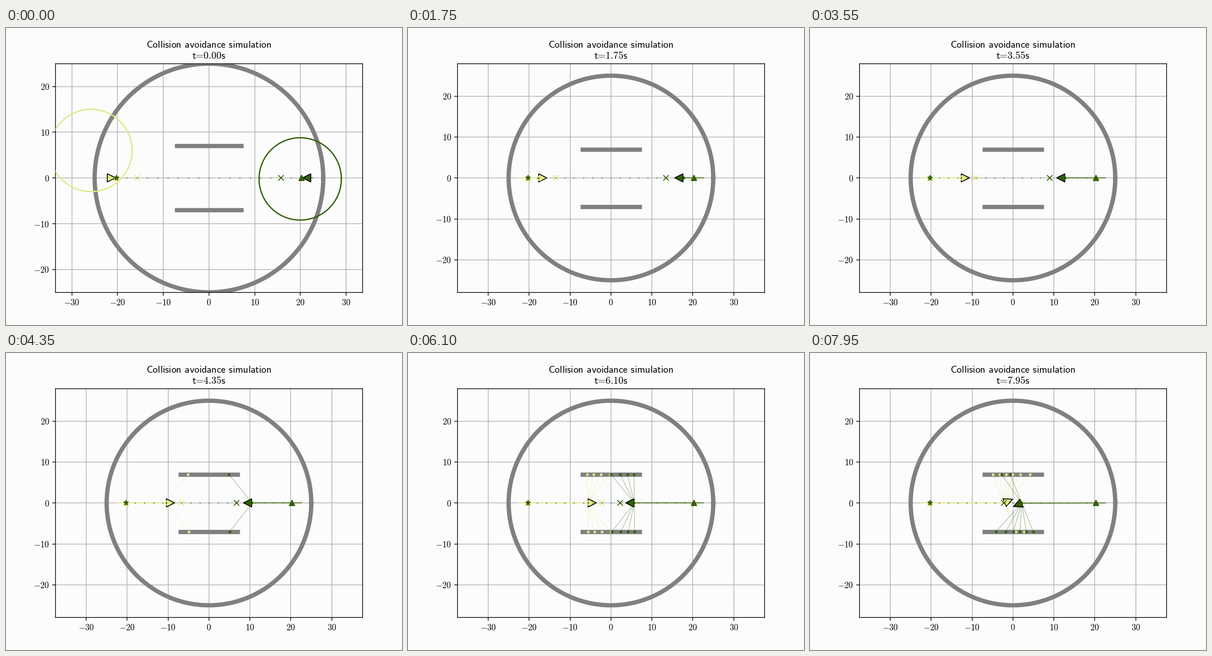
Write a matplotlib script that moves like this. It is 864 px wide and 648 px high and loops after 8000 ms.

```python
import math

import numpy as np
import matplotlib.pyplot as plt
from matplotlib.animation import FuncAnimation
from matplotlib.markers import MarkerStyle

plt.rcParams["mathtext.fontset"] = "cm"

DPI, FRAMES, STEP = 135, 160, 50
PAPER, GREY = "#fcfcfc", "#808080"
YELLOW, GREEN = "#e3e886", "#336005"
WALL_Y, WALL_HALF, RAY_RANGE = 7.0, 7.5, 10.0
RAYS = np.radians(np.linspace(-90, 90, 15))
WAYPOINTS = np.linspace(-20.25, 20.25, 19)
BRAKE = 6.85

fig = plt.figure(figsize=(864 / DPI, 648 / DPI), dpi=DPI, facecolor=PAPER)
ax = fig.add_axes([0.125, 0.11, 0.775, 0.77], facecolor=PAPER)
ax.set_axisbelow(True)
ax.grid(True, color="#b0b0b0", lw=0.8)
ax.set_xticks(range(-30, 31, 10))
ax.set_yticks(range(-20, 21, 10))
for axis in (ax.xaxis, ax.yaxis):
    axis.set_major_formatter(lambda v, _: f"${int(round(v))}$")


def heading_line(y, text=""):
    return fig.text(442.8 / 864, 1 - y / 648, text, ha="center",
                    va="baseline", fontsize=11.66)


GAP = r"\hspace{0.38}"
heading_line(43.3, rf"$\mathsf{{Collision{GAP}avoidance{GAP}simulation}}$")
clock = heading_line(67)

turn = np.linspace(0, 2 * math.pi, 361)
ax.plot(25 * np.cos(turn), 25 * np.sin(turn), color=GREY, lw=5, zorder=2)
for y in (WALL_Y, -WALL_Y):
    ax.plot([-WALL_HALF, WALL_HALF], [y, y], color=GREY, lw=5,
            solid_capstyle="butt", zorder=2)


def travel(t):
    """Position, heading and marker centre of the robot coming from the left."""
    x = -22.64 + 2.776 * min(t, BRAKE) + 0.18 * math.exp(-t / 0.2)
    y, angle = 0.0, 0.6
    if t > 6.3:
        angle += 1.1 * min((t - 6.3) / (BRAKE - 6.3), 1)
    if t > BRAKE:
        late = t - BRAKE
        x += 2.776 * 0.65 * (1 - math.exp(-late / 0.65))
        y = 0.05 * late / 1.1
        angle += 20.3 * (late / 1.1) ** 1.4
    a = math.radians(angle)
    return x, y, angle, x + 1.13 * math.cos(a), y + 1.13 * math.sin(a)


def scan(x, y, angle):
    """Points where the range sensor meets a wall."""
    hits = []
    for a in RAYS + math.radians(angle):
        s = math.sin(a)
        if abs(s) < 1e-6:
            continue
        dist = (math.copysign(WALL_Y, s) - y) / s
        hit = x + dist * math.cos(a)
        if dist < RAY_RANGE and abs(hit) < WALL_HALF - 0.5:
            hits.append((hit, y + dist * s))
    return hits


class Robot:
    def __init__(self, side, color, z, error):
        self.side, self.color, self.error = side, color, error

        def line(dz, **kw):
            return ax.plot([], [], color=color, zorder=z + dz, **kw)[0]

        ax.plot(WAYPOINTS, 0 * WAYPOINTS, "o", color=color, ms=1.2, mew=0,
                zorder=z)
        ax.plot([side * -20.25], [0], "^", color=color, ms=6, zorder=z + 1.2)
        self.trail = line(0.1, lw=0.9)
        self.rays = line(0.2, lw=0.7, alpha=0.4)
        self.hits = line(0.3, ls="", marker="o", ms=3.2, mew=0)
        self.target = line(0.4, ls="", marker="x", ms=6, mew=1)
        self.body = line(0.5, ls="", marker="^", ms=10, mec="black", mew=1)
        self.belief = line(0.6, lw=1.5)

    def update(self, t):
        s = self.side
        x, y, angle, cx, cy = travel(t)
        self.trail.set_data([s * -22.64, s * x], [0, s * y])
        self.body.set_data([s * cx], [s * cy])
        face = angle - 90 + (180 if s < 0 else 0)
        self.body.set_marker(MarkerStyle("^").rotated(deg=face))

        ahead = max(2, int(np.searchsorted(WAYPOINTS, cx + 1.75)))
        self.target.set_data([s * WAYPOINTS[ahead]], [0])

        pts = [(s * px, s * py) for px, py in scan(x, y, angle)]
        self.hits.set_data([p[0] for p in pts], [p[1] for p in pts])
        rx, ry = [], []
        for px, py in pts:
            rx += [s * x, px, math.nan]
            ry += [s * y, py, math.nan]
        self.rays.set_data(rx, ry)

        fade = math.exp(-t / 0.28)
        ex, ey, dip = self.error
        mx = s * (x + 0.4) + ex * fade
        my = s * y + ey * fade + dip * math.exp(-((t - 0.9) / 0.6) ** 2)
        r = 0.48 + 8.52 * math.exp(-t / 0.3)
        self.belief.set_data(mx + r * np.cos(turn), my + r * np.sin(turn))


robots = [Robot(1, YELLOW, 3, (-3.74, 6.1, -0.7)),
          Robot(-1, GREEN, 4, (-2.1, -0.2, 0.0))]
ax.plot([-20.25], [0], "*", color=GREEN, ms=6, zorder=5.3)


def draw(i):
    t = i * STEP / 1000
    half = 33.56 if i == 0 else 37.5
    tall = half * 498.96 / 669.6
    ax.set_xlim(-half, half)
    ax.set_ylim(-tall, tall)
    equals = r"\hspace{-0.2}=\hspace{-0.2}"
    clock.set_text(rf"$\mathsf{{t{equals}{t:.2f}s}}$")
    for robot in robots:
        robot.update(t)
    return []


anim = FuncAnimation(fig, draw, frames=FRAMES, interval=STEP,
                     init_func=lambda: draw(0), repeat=True, repeat_delay=0,
                     blit=False)
plt.show()
```
